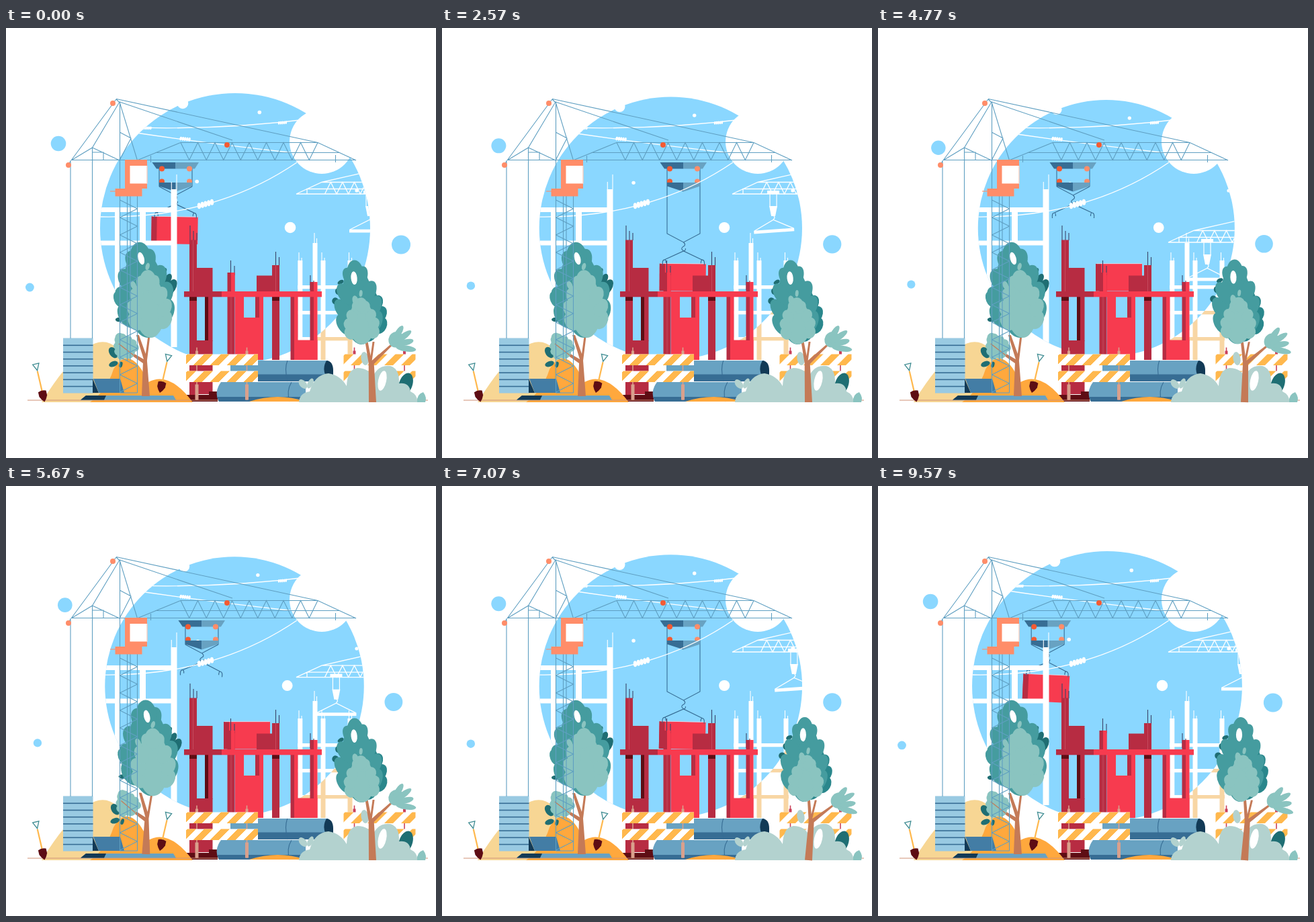
Animation of 640 by 640 pixels, one loop 9.61 s. Source, as an HTML page:

```html
<!DOCTYPE html>
<html lang="en">
<head>
<meta charset="utf-8">
<title>Construction site</title>
<style>
html, body { margin: 0; width: 100%; height: 100%; overflow: hidden; background: #fff; }
svg { display: block; width: 100vw; height: 100vh; }
</style>
</head>
<body>
<svg id="stage" viewBox="0 0 640 640"></svg>
<script>
const LOOP = 9610, HALF = LOOP / 2;
const SKY = '#8ad7ff', WHITE = '#fff', STEEL = '#5f9fc1', BLUE = '#68a2c2', NAVY = '#376d94', INK = '#123a56';
const RED = '#f73b4f', WINE = '#b72c42', MAROON = '#5e0d14', ORANGE = '#ffa83d', SAND = '#f7d694', TAN = '#f8d6a4';
const CORAL = '#ff8d69', FLAME = '#f45b33', BARK = '#c47a57', PINK = '#d9a08c', IRON = '#3b4569';
const TEAL = '#459c9f', MINT = '#8ac4c0', PINE = '#1f6e73', SHADE = '#2a878c', HAZE = '#b3d2cf';

// Drawing helpers
const repeat = (count, draw) => Array.from({ length: count }, (_, i) => draw(i)).join('');
const rect = (x, y, w, h, fill) => `<rect x="${x}" y="${y}" width="${w}" height="${h}" fill="${fill}"/>`;
const dot = (x, y, r, fill) => `<circle cx="${x}" cy="${y}" r="${r}" fill="${fill}"/>`;
const shape = (d, fill) => `<path d="${d}" fill="${fill}"/>`;
const line = (d, color, width = 1.1) => `<path d="${d}" fill="none" stroke="${color}" stroke-width="${width}"/>`;
const at = (x, y, turn, body) => `<g transform="translate(${x} ${y}) rotate(${turn})">${body}</g>`;
const group = (id, body) => `<g id="${id}">${body}</g>`;
const leaf = (x, y, rx, ry, turn, fill) => at(x, y, turn, `<ellipse rx="${rx}" ry="${ry}" fill="${fill}"/>`);
const zigzag = (x, y, height, step, count) =>
  `M${x} ${y}` + repeat(count, i => `L${x + (i + 1) * step} ${y + (i % 2 ? 0 : height)}`);

// Rounded crown growing up from (x, y): a core with pairs of upturned lobes.
function foliage(x, y, height, width, turn, fill) {
  const lobes = repeat(4, i => {
    const reach = width * Math.cos(.42 * (i - .6)) - .36 * width;
    return [-1, 1].map(side =>
      leaf(side * reach, -height * (.25 + .18 * i), width * .28, height * .14, side * 28, fill)).join('');
  });
  return at(x, y, turn, leaf(0, -height * .46, width * .66, height * .46, 0, fill) + lobes +
    leaf(0, -height * .85, width * .33, height * .15, 0, fill));
}

const beads = (x, y, turn, size) =>
  at(x, y, turn, repeat(5, i => leaf((i - 2) * size * 1.15, 0, size * .62, size * 1.05, 12, WHITE)));

const rebar = (x, y, gap, count, color) =>
  line(repeat(count, i => `M${x + i * gap} ${y + (i % 2) * 8}v${22 - (i % 2) * 8}`), color);

const backdrop = () =>
  dot(341, 298, 201, SKY) + dot(78, 172, 11.3, SKY) + dot(35.4, 386, 6.4, SKY) + dot(588, 322.5, 14, SKY) +
  dot(263, 112, 8.3, WHITE) + dot(377.3, 125.5, 2.8, WHITE) + dot(284.2, 228.5, 2.8, WHITE) + dot(423, 297, 8.3, WHITE);

const rightFrame = color =>
  [434.3, 468.5, 508.5].map(x => rect(x, 346, 7, 148, color)).join('') + rect(456.5, 320, 7, 130, color) +
  [383, 421, 460].map(y => rect(434, y, 82, 5.3, color)).join('');

const whiteFrames = () =>
  rect(162, 267, 7.5, 203, WHITE) + rect(199, 267, 9, 53, WHITE) + rect(245.5, 240, 9, 235, WHITE) +
  [267, 316.5].map(y => rect(130, y, 117, 7, WHITE)).join('') + rightFrame(WHITE) +
  line('M246.3 229V240M254 218V240', WHITE) + rebar(459, 305, 3.5, 2, WHITE) +
  [436, 470, 510.5].map(x => rebar(x, 334, 4, 2, WHITE)).join('');

const wires = () =>
  line('M140 146Q300 155 455 135', WHITE, 1.3) + beads(210, 149, 0, 2.3) + beads(411.5, 141, -4, 2.3) +
  line('M180 154Q300 172 430 186', WHITE, 1.3) + beads(266.5, 165.2, 6, 2.8) +
  line('M120 282L141 281Q310 284 433 200', WHITE, 1.3) + beads(297, 262, -16, 4.3) + dot(522, 242, 2.6, WHITE);

const farCrane = () => group('farJib',
  line('M560 247H432L470 229.5H560M470 229.5L560 209M448 247V239.5H560' + zigzag(474.5, 247, -17.5, 8.8, 10), WHITE, 1.3) +
  group('farLoad', rect(-9, 242, 18, 5, WHITE) + line('M-5 247V266M5 247V266', WHITE, 1.2) +
    shape('M-6 265H6L3 280H-3Z', WHITE) + line('M0 279q4 3 0 6', WHITE, 1.3) +
    group('farBeam', line('M-29 300L0 285.5L29 300', WHITE, 1.3) + rect(-30, 299.7, 60, 4.8, WHITE))));

const hoist = () =>
  group('load', rect(-35.5, 281, 69, 40.5, RED) + rect(-35.5, 281, 8, 40.5, WINE) + line('M-34 280.7H33', '#fbd9e0', .7)) +
  group('trolley',
    line('M-24.5 209V236M24.5 209V236', NAVY) + shape('M-35 200H0V209.5H-28.5Z', NAVY) + shape('M0 200H34.5L28.5 209.5H0Z', BLUE) +
    [209.5, 228.5].map(y => dot(-20.5, y, 4, FLAME) + dot(20.5, y, 4, CORAL)).join('') +
    shape('M-24.5 230H0V243.5L-24.5 235.5Z', NAVY) + shape('M0 230H24.5V235.5L0 243.5Z', BLUE) +
    `<path id="cable" fill="none" stroke="${NAVY}" stroke-width="1.1"/>` +
    group('hook', line('M0 249q4 4 0 6q-5 3-1 6q4 2 4-3', NAVY) +
      line('M-31 283q-1-8 3-8q2 0 2 5M31 283q1-8-3-8q-2 0-2 5M-28 275L0 262L28 275', NAVY, 1.2)));

const redBuilding = () =>
  rebar(274, 294, 5, 2, IRON) + line('M284 305V316', IRON) + rebar(334.5, 346, 5.5, 2, IRON) +
  rebar(401.5, 333, 5, 2, IRON) + rebar(453, 368, 5, 2, IRON) +
  rect(273, 315.5, 11, 231, WINE) + rect(284, 357, 23.5, 36, WINE) + rect(296, 400, 5, 66, MAROON) + rect(301, 400, 6.5, 66, WINE) +
  rect(273, 465, 34.5, 80, WINE) + rect(268, 546, 47, 10, MAROON) + rect(302, 541, 13, 6, MAROON) +
  rect(329.5, 364, 11, 130, WINE) + rect(335, 364, 5.5, 28, RED) + shape('M341 400H354V431H371V400H383V494H341Z', RED) +
  rect(371, 400, 6, 31, WINE) + rect(373, 368.5, 24, 24, WINE) + rect(396, 353, 11, 141, WINE) +
  rect(423.5, 400, 6, 94, WINE) + rect(429, 400, 5.5, 94, RED) + rect(434, 464.5, 29.5, 29.5, RED) +
  rect(452.5, 378, 5.5, 87, WINE) + rect(458, 378, 5.5, 116, RED) +
  rect(273, 400, 11, 6, MAROON) + rect(396, 400, 11, 6, MAROON) +
  line('M278.5 316V392M401.5 353V392M335 400V494', '#cf6272', .6) +
  rect(265, 392, 56, 8.3, WINE) + rect(321, 392, 149, 8.3, RED);

const sand = () =>
  shape('M53 557Q88 500 120 476Q146 458 166 477Q184 490 205 557Z', SAND) +
  shape('M125 557Q150 540 160 508Q184 468 212 527Q243 510 278 557Z', ORANGE);

const shovel = (x, y, turn) => at(x, y, turn,
  line('M0 11V44', '#ffb84d', 2.2) + line('M-4.7 0H4.7L0 10Z', '#3d8b91', 1.3) +
  shape('M-6 42Q0 39 6 42V49Q4 54 0 58Q-4 54-6 49Z', MAROON));

const materials = () =>
  rect(85, 461.5, 44.5, 82, '#99cae2') + repeat(7, i => rect(85, 471.5 + i * 10.2, 44.5, 1.6, NAVY)) +
  shape('M129 543V522L138 543Z', INK) + shape('M130 522H170L176 543H138Z', '#437da5') +
  shape('M111 553.5L119 547H249L253 553.5Z', BLUE) + shape('M111 553.5L119 547H149L146 553.5Z', INK);

const leftTree = () => group('leftTree',
  repeat(3, i => leaf(236 + i * 5, 362 + i * 12, 3 + i * 2, 5 + i * 4, 30, PINE)) +
  leaf(168, 404, 7, 12, -22, TEAL) + leaf(171, 402, 3, 7, -25, WHITE) + leaf(169, 434, 6, 3.3, 0, PINE) +
  shape('M202 548L204 499L184 485L186 482L205 493L194 457H198L208 485L212 455H215L210 495L214 548Z', BARK) +
  foliage(213, 461, 143, 46, -6, TEAL) + foliage(216, 461, 101, 36, -3, MINT) +
  leaf(201.5, 343, 4.5, 9.5, -15, WHITE) + leaf(211, 355, 3, 5.5, 15, MINT) + leaf(190, 383, 4, 7, -25, MINT) +
  leaf(160, 483, 6, 9, -35, PINE) + leaf(160, 500, 7, 4, -20, PINE) + leaf(171, 501, 2.5, 4.5, 15, PINE) +
  foliage(187, 491, 42, 20, -30, MINT) + line('M168 470L190 487', BARK, 1.2));

const mainCrane = () => {
  const cables = 'M97 196.5H521M164 106L97 197M164 105.5L464 170.5M169 110L337 167M164 106L169 111M96 197V462M128.5 178V462';
  const mast = 'M169.5 110V543M195.5 250V543M180.5 250V495M185 250V495M169.5 543H195.5';
  const brace = 'M195.5 197L169 110L128.5 178L97 197M169 155L186 164L169 197L128.5 178M128.5 185H145V197M96 198L93 204';
  const jib = 'M195 197L260 170.5H464L521 197M215.5 190V200M490.5 189V200M222 185.5H497' + zigzag(260, 170.5, 26, 12.75, 16);
  return line(cables + mast + brace + jib, STEEL) + at(169.5, 250, 90, line(zigzag(6, 0, -26, 13, 22), STEEL)) +
    dot(159, 112, 4, CORAL) + dot(93, 204, 4, CORAL) + dot(329, 174, 4, FLAME) +
    shape('M177 196H210V239H177Z', CORAL) + rect(184.5, 205, 26, 26.5, WHITE) + line('M210 205V231', CORAL, .6) +
    rect(162.5, 239, 40, 11.5, CORAL) + line('M155 243H163', CORAL);
};

const pipes = () =>
  rect(334, 495, 146, 31, BLUE) + rect(334, 515.5, 146, 10.5, NAVY) + line('M419 495Q414 506 419 526', NAVY) +
  shape('M477 495Q487 496 487 510V516H475Q471 505 477 495Z', INK) +
  shape('M320 527H446V556H317Q309 542 320 527Z', BLUE) + shape('M314 549H446V556H317Z', NAVY) +
  line('M425 527Q417 540 422 556', NAVY) + shape('M362 556Q405 542 446 556Z', ORANGE);

const barrier = (x, post) => at(x, 485.5, 0,
  [16, 90.5].map(dx => line(`M${dx} -10V68`, post, 1.6) + rect(dx - 2.5, 45, 5, 23, PINK) + rect(dx - 2, -5, 4, 6, post)).join('') +
  [0, 25].map(y => rect(0, y, 107, 16.5, WHITE) + rect(0, y, 107, 16.5, 'url(#stripes)')).join(''));

const bush = () =>
  leaf(595, 530, 10, 17, 18, PINE) + shape('M612 557Q611 545 621 542Q627 550 624 557Z', MINT) + leaf(534, 492, 5.5, 10, -10, HAZE) +
  leaf(442, 530, 5, 8, -40, HAZE) + leaf(453, 529, 4, 8, 25, HAZE) +
  shape('M436 557Q437 543 452 541Q459 516 480 514Q498 517 507 533Q508 508 523 506Q539 506 546 519Q554 501 572 503Q586 507 585 529Q600 527 602 541Q613 546 612 557Z', HAZE) +
  leaf(560, 525, 6, 15, 12, WHITE);

const rightTree = () => group('rightTree',
  foliage(540, 467, 92, 32, -3, SHADE) +
  repeat(3, i => leaf(499 - i * 4, 378 + i * 14, 3 + i, 5, 60 - i * 80, PINE)) +
  shape('M540 557L540 499L535 467H539L543 488L546 467H549L545 495L573 471L575 473L548 500L551 557Z', BARK) +
  foliage(530, 471, 126, 37, -5, TEAL) + foliage(531, 471, 70, 29, -2, MINT) +
  leaf(519, 372, 4.6, 10, -5, WHITE) + leaf(521, 406, 4.5, 8, -15, MINT) + leaf(529, 395, 2.5, 5, 5, MINT) +
  leaf(581, 464, 11, 12, 30, MINT) +
  at(572, 474, 0, repeat(4, i => at(0, 0, 8 - i * 22, leaf(24, 0, 15 - i % 2 * 3, 4.5, 0, MINT)))));

const stage = document.getElementById('stage');
stage.innerHTML = `<defs><clipPath id="lens"><circle id="lensDisc" cx="341" cy="298" r="201"/></clipPath>
  <pattern id="stripes" width="25" height="640" patternUnits="userSpaceOnUse" patternTransform="translate(2 0) skewX(-45)">
  ${rect(0, 0, 13, 640, '#ffb84d')}</pattern></defs>` +
  rightFrame(TAN) + group('backdrop', backdrop()) + dot(470, 169, 48, WHITE) + hoist() +
  `<g clip-path="url(#lens)">${wires() + farCrane() + whiteFrames()}</g>` +
  redBuilding() + sand() + line('M32 554H628', '#cf9176', 1.2) + materials() + leftTree() + mainCrane() +
  shovel(44.3, 500, -13) + shovel(242, 486.5, 13) + pipes() + barrier(268, PINK) + barrier(502.5, '#c9405a') + bush() + rightTree();

// Motion
const clamp = p => Math.min(1, Math.max(0, p));
const sine = p => (1 - Math.cos(Math.PI * p)) / 2;
const cubic = p => p < .5 ? 4 * p ** 3 : 1 - (2 - 2 * p) ** 3 / 2;
const ramp = (t, start, end, ease = sine) => ease(clamp((t - start) / (end - start)));
const place = (id, transform) => document.getElementById(id).setAttribute('transform', transform);
const RELEASE = 2620;

function render(t) {
  const u = Math.min(t, LOOP - t); // the hoist and sky run forwards, then back
  const zoom = `translate(317 298) scale(${1 - .05 * u / HALF}) translate(-317 -298)`;
  place('backdrop', zoom);
  place('lensDisc', zoom);

  const loaded = u < RELEASE;
  const x = 252.5 + 107 * ramp(u, 0, 1540) - 69 * ramp(u, 2750, 4150, cubic);
  const drop = 70 * (ramp(u, 1500, 2480) - ramp(u, RELEASE, 3300));
  const swing = loaded
    ? 2.5 * Math.cos(2 * Math.PI * u / 2700) * clamp((u + 15) / 50) * clamp((2585 - u) / 90)
    : 3 * Math.sin(Math.PI * (u - 3770) / 500) * clamp((u - 3300) / 300);
  place('trolley', `translate(${x} 0)`);
  place('hook', `translate(0 ${drop}) rotate(${swing} 0 262)`);
  document.getElementById('cable').setAttribute('d', `M-24.5 236v${drop}L0 ${249 + drop}L24.5 ${236 + drop}v${-drop}`);
  place('load', loaded ? `translate(${x} ${drop}) rotate(${swing} 0 262)` : 'translate(359.5 70)');

  const lower = 72 * (ramp(t, 2600, 4000) - ramp(t, 5030, 6350));
  const farX = 541 - 48 * (ramp(t, 1400, 2600) - ramp(t, 6300, 7600)) - lower / 24;
  const tilt = -4 * (ramp(t, 1400, 2300) - ramp(t, 2600, 3200) + ramp(t, 6300, 6900) - ramp(t, 7200, 8000));
  place('farJib', `translate(0 ${lower})`);
  place('farLoad', `translate(${farX} 0)`);
  place('farBeam', `rotate(${tilt} 0 285)`);

  const leftSway = 1.3 - 1.4 * Math.cos(8 * Math.PI * t / LOOP);
  const rightSway = 2.7 - 3 * Math.sin(Math.PI / 2 * Math.cos(7 * Math.PI * t / LOOP));
  place('leftTree', `rotate(${leftSway} 208 557)`);
  place('rightTree', `rotate(${rightSway} 545 557)`);
}

function tick() {
  render(performance.now() % LOOP);
  requestAnimationFrame(tick);
}
tick();
</script>
</body>
</html>
```
